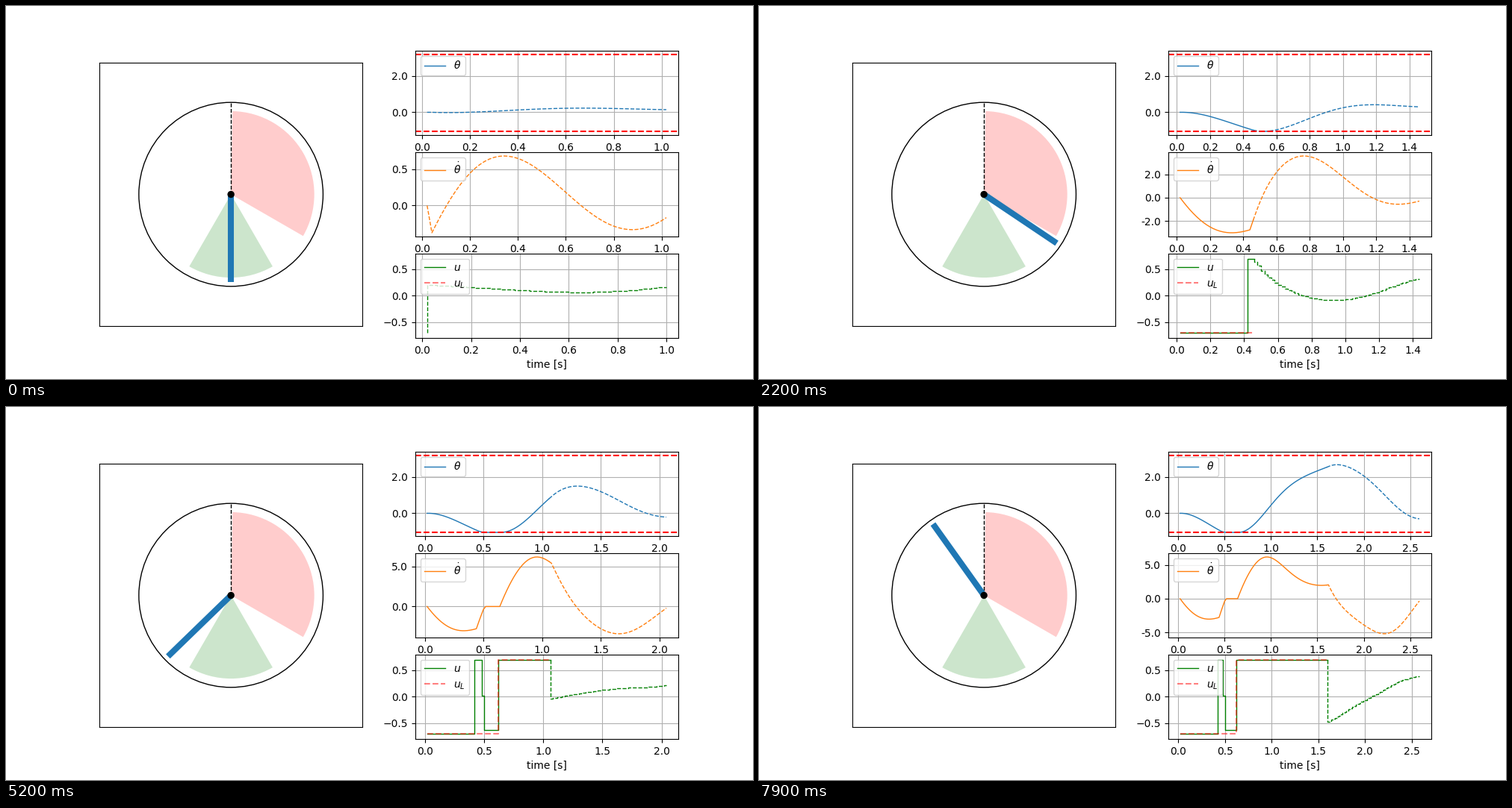
Recreate the animation shown at these times as a matplotlib script. Size 1000 px wide and 500 px high, loop 8 s.

```python
import math
import numpy as np
import matplotlib.pyplot as plt
from matplotlib.animation import FuncAnimation
from matplotlib.patches import Circle, Wedge
from matplotlib.ticker import FormatStrFormatter

FRAMES = 80
DT = 0.02
HORIZON = 50
MASS, LENGTH, FRICTION, GRAVITY = 0.15, 0.5, 0.1, 9.81
INERTIA = MASS * LENGTH ** 2
PULL, DRAG = GRAVITY / LENGTH, FRICTION / INERTIA
U_MAX = 0.7
LOW, HIGH = -np.pi / 3, np.pi + 0.02
SAFE = np.pi / 6
EPS = 0.004


def step(x, u):
    """One Euler step of the pendulum."""
    th, om = x
    return th + DT * om, om + DT * (u / INERTIA - PULL * math.sin(th) - DRAG * om)


def rollout(x, us):
    xs = [x]
    for u in us:
        xs.append(step(xs[-1], u))
    return np.array(xs)


def stop_torque(x):
    """Torque that brings the speed to zero in one step."""
    th, om = x
    return INERTIA * (PULL * math.sin(th) + DRAG * om - om / DT)


def learned_torque(n):
    return -U_MAX if n <= 30 else U_MAX


def safe_torque(n, x):
    """Learned torque, overruled by braking and holding at the limit."""
    if 21 <= n <= 23:
        return U_MAX
    if 24 <= n <= 30:
        return stop_torque(x)
    return learned_torque(n)


def run():
    x, xs, us = (0.0, 0.0), [], []
    for n in range(FRAMES):
        xs.append(x)
        us.append(safe_torque(n, x))
        x = step(x, us[-1])
    return np.array(xs), np.array(us)


# The plan keeps torque, angle and final state as far as possible from
# their bounds: a sum of log barriers, extended by parabolas below EPS.
M = HORIZON - 1
UPPER = np.r_[np.full(M, U_MAX), np.full(M - 1, HIGH), SAFE, SAFE]
LOWER = np.r_[np.full(M, -U_MAX), np.full(M - 1, LOW), -SAFE, -SAFE]


def barrier(s):
    """Value, slope and curvature for a distance s to a bound."""
    far, d = s > EPS, np.maximum(s, EPS)
    q = s / EPS - 2
    return (np.where(far, -np.log(d), (q * q - 1) / 2 - math.log(EPS)),
            np.where(far, -1 / d, q / EPS), 1 / d ** 2)


def cost(x, us):
    xs = rollout(x, us)
    z = np.r_[us, xs[1:, 0], xs[-1, 1]]
    low, up = barrier(z - LOWER), barrier(UPPER - z)
    return (low[0] + up[0]).sum(), low[1] - up[1], low[2] + up[2], xs


def jacobian(xs):
    d_th, d_om = np.zeros((M + 1, M)), np.zeros((M + 1, M))
    for i in range(M):
        d_th[i + 1] = d_th[i] + DT * d_om[i]
        d_om[i + 1] = (1 - DT * DRAG) * d_om[i] - DT * PULL * math.cos(xs[i, 0]) * d_th[i]
        d_om[i + 1, i] += DT / INERTIA
    return np.vstack([np.eye(M), d_th[1:], d_om[-1:]])


def solve(x, us):
    """Gauss-Newton descent with halved steps."""
    value, slope, curve, xs = cost(x, us)
    for _ in range(50):
        J = jacobian(xs)
        move = -np.linalg.solve(J.T @ (curve[:, None] * J), J.T @ slope)
        for size in 0.5 ** np.arange(9):
            trial = cost(x, us + size * move)
            if trial[0] < value:
                break
        else:
            break
        us = us + size * move
        value, slope, curve, xs = trial
        if size * np.abs(move).max() < 3e-4:
            break
    return us


def make_plans():
    plans, us = [], np.zeros(M)
    for k in range(FRAMES):
        x = tuple(X[k])
        us = solve(step(x, U[k]), us)
        full = np.r_[U[k], us]
        plans.append((rollout(x, full), full))
    return plans


X, U = run()
U_LEARN = np.array([learned_torque(n) for n in range(FRAMES)])
T = DT * (1 + np.arange(FRAMES + HORIZON + 1))
PLANS = make_plans()

fig = plt.figure(figsize=(10, 5), dpi=100)

# Pendulum view
ax = fig.add_subplot(1, 2, 1, aspect="equal")
side = (-1.5 * LENGTH, 1.5 * LENGTH)
ax.set(xlim=side, ylim=side, xticks=[], yticks=[])
for start, end, color in [(-30, 270 - np.degrees(HIGH), "red"), (-120, -60, "green")]:
    ax.add_patch(Wedge((0, 0), 0.95 * LENGTH, start, end, fc=color, ec="none", alpha=0.2))
ax.add_patch(Circle((0, 0), 1.05 * LENGTH, fill=False, ec="black", lw=1))
ax.plot([0, 0], [0, 1.05 * LENGTH], "k--", lw=1)
rod, = ax.plot([], [], color="C0", lw=5.8, solid_capstyle="butt", zorder=3)
ax.add_patch(Circle((0, 0), 0.02, fc="black", ec="none", zorder=4))

# Time plots
ax_th, ax_om, ax_u = plots = [fig.add_subplot(3, 2, i) for i in (2, 4, 6)]


def pair(axis, color, label, **kw):
    past, = axis.plot([], [], color=color, lw=1, label=label, **kw)
    ahead, = axis.plot([], [], "--", color=color, lw=1, **kw)
    return past, ahead


th_lines = pair(ax_th, "C0", r"$\theta$")
om_lines = pair(ax_om, "C1", r"$\dot{\theta}$")
u_past, u_ahead = pair(ax_u, "green", "$u$", drawstyle="steps-pre")
u_learn, = ax_u.plot([], [], "--", color="red", alpha=0.5, label="$u_L$",
                     drawstyle="steps-pre")
for limit in (LOW, HIGH):
    ax_th.axhline(limit, color="red", ls="--")
for axis in (ax_th, ax_om):
    axis.yaxis.set_major_formatter(FormatStrFormatter("%.1f"))
for axis in plots:
    axis.grid(True)
    axis.legend(loc="upper left")
ax_u.set_ylim(-0.8, 0.8)
ax_u.set_xlabel("time [s]")


def update(k):
    xs, us = PLANS[k]
    th = X[k, 0]
    rod.set_data([0, -LENGTH * np.sin(th)], [0, -LENGTH * np.cos(th)])
    now, later = slice(0, k + 1), slice(k, k + HORIZON + 1)
    for i, (past, ahead) in enumerate([th_lines, om_lines]):
        past.set_data(T[now], X[now, i])
        ahead.set_data(T[later], xs[:, i])
    u_past.set_data(T[now], U[now])
    u_learn.set_data(T[now], U_LEARN[now])
    u_ahead.set_data(T[later][:-1], us)
    for axis in plots:
        axis.relim()
        axis.autoscale_view()


anim = FuncAnimation(fig, update, frames=FRAMES, init_func=lambda: None,
                     interval=100, repeat=True, repeat_delay=0)
plt.show()
```
